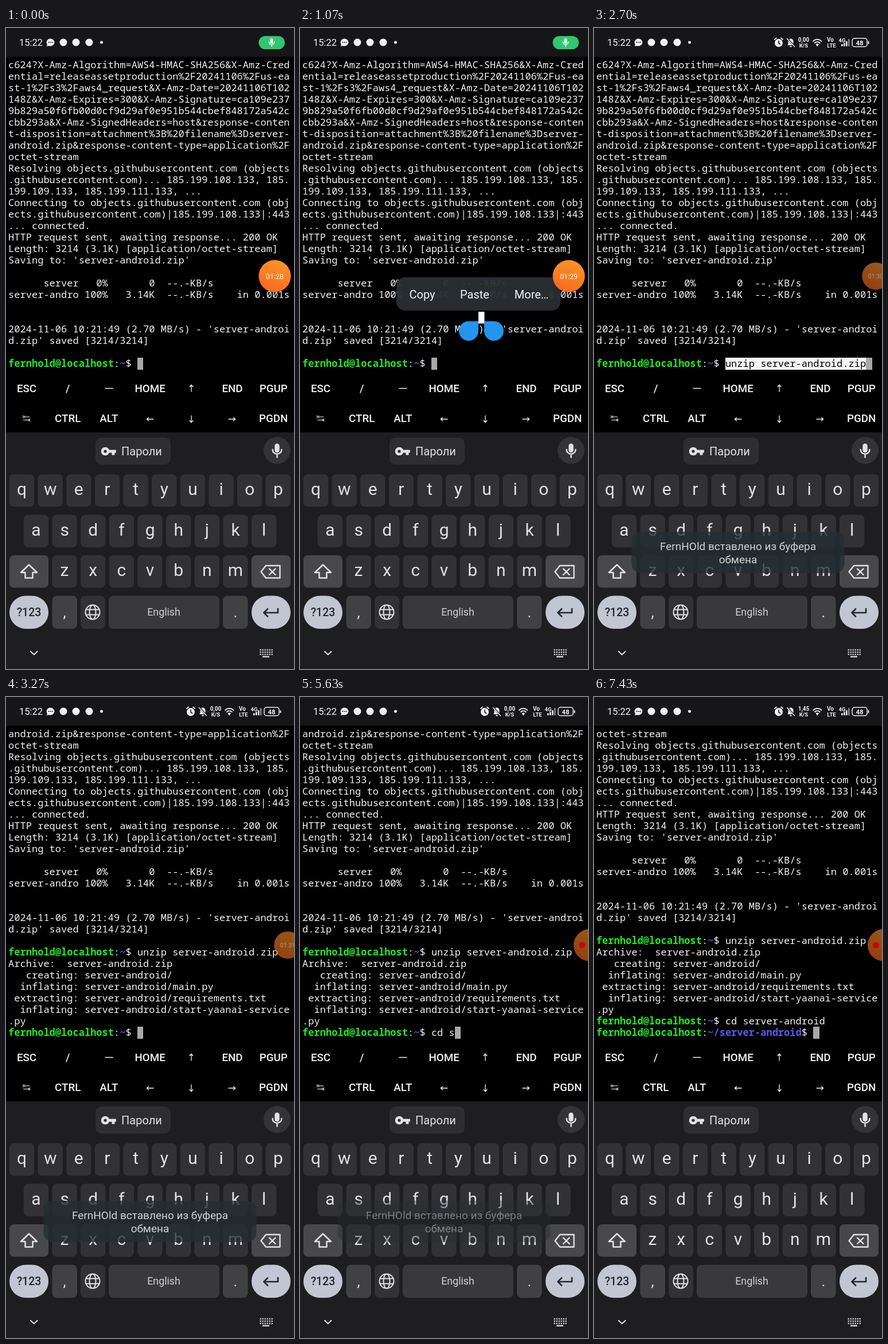
Recreate the animation shown at these times as an HTML page. Size 502x1116 px, loop 7.71 s.

```html
<!DOCTYPE html>
<html lang="ru">
<head>
<meta charset="utf-8">
<title>Terminal</title>
<style>
html, body { margin: 0; width: 100%; height: 100%; overflow: hidden; background: #000; }
svg, #term { position: absolute; left: 0; top: 0; }
svg text { font-family: Roboto, "Open Sans", sans-serif; }
#term { left: 4.1px; top: 54px; margin: 0; color: #f2f2f2; white-space: pre;
  font: 17.04px/20px "Noto Sans Mono", "DejaVu Sans Mono", monospace; }
#term b { color: #1cec22; }
#term i { color: #5a5af0; font-style: normal; font-weight: 700; }
#term u { color: #000; text-decoration: none; }
.block { position: absolute; top: 574px; height: 20.5px; }
</style>
</head>
<body>
<svg id="base" width="502" height="1116" viewBox="0 0 502 1116"></svg>
<div id="mark" class="block" style="background:#f6f6f6"></div>
<div id="cursor" class="block" style="background:#a8a8a8;width:10.2px"></div>
<pre id="term"></pre>
<svg id="over" width="502" height="1116" viewBox="0 0 502 1116"></svg>
<script>
const LOOP = 7710, COL = 10.224, LEFT = 4.1, ROWS = 27;
const $ = id => document.getElementById(id);

// ---- drawing helpers
const rect = (x, y, w, h, r, fill, more = '') =>
  `<rect x="${x}" y="${y}" width="${w}" height="${h}" rx="${r}" fill="${fill}" ${more}/>`;
const disc = (x, y, r, fill) => `<circle cx="${x}" cy="${y}" r="${r}" fill="${fill}"/>`;
const text = (x, y, s, size, fill, weight = 400, anchor = 'middle') =>
  `<text x="${x}" y="${y}" font-size="${size}" fill="${fill}" font-weight="${weight}" text-anchor="${anchor}">${s}</text>`;
const line = (d, color, w = 2) =>
  `<path d="${d}" fill="none" stroke="${color}" stroke-width="${w}" stroke-linecap="round" stroke-linejoin="round"/>`;
const fill = (d, color) => `<path d="${d}" fill="${color}"/>`;

const INK = '#e2e2e6', WHITE = '#f2f2f2', BAR = '#161618', KEY = '#323235', SIDE = '#48484b',
  SPACE = '#39393c', LIGHT = '#c2c5d2', DARK = '#24252e';

function mic(x, y, s, color) {
  return `<g transform="translate(${x} ${y}) scale(${s})">` + rect(-4, -12, 8, 15, 4, color) +
    line('M-7.5-2a7.5 7.5 0 0 0 15 0M0 6v5', color, 2.4) + '</g>';
}

function statusLeft() {
  let s = rect(0, 0, 502, 50, 0, BAR) + text(23, 31, '15:22', 16.5, WHITE, 400, 'start');
  s += fill('M77.500 18.500a7 6.500 0 1 1-3 12.400l-3.600 1.200 1-3.400a7 6.500 0 0 1 5.600-10.200z', WHITE);
  for (const x of [74.5, 77.5, 80.5]) s += disc(x, 25, 1, BAR);
  for (const x of [100, 122, 145]) s += disc(x, 25, 6.5, WHITE);
  return s + disc(166.5, 25, 2.5, WHITE);
}

function statusRight() {
  let s = disc(322, 26, 7, WHITE) + line('M322 22.500v4l2.500 1.500', BAR, 1.6) +
    line('M315 20l3-2.500M329 20l-3-2.500', WHITE, 1.8);
  s += fill('M337 30l1.500-2v-4.500a4.500 5 0 0 1 9 0v4.500l1.500 2zM341 31.500h4a2 2 0 0 1-4 0z', WHITE) +
    line('M337 18.500l12.500 13.500', BAR, 3) + line('M336.500 18.500l13 14', WHITE, 1.4);
  s += `<text id="speed" x="365.500" y="23.500" font-size="10" font-weight="600" fill="${WHITE}" text-anchor="middle"></text>`;
  s += text(365.5, 33.5, 'K/S', 9.5, WHITE, 600);
  s += line('M382 23a10 10 0 0 1 14.500 0M384.800 26a6.500 6.500 0 0 1 9 0', WHITE, 1.8) + fill('M386.500 28.500a4 4 0 0 1 5.500 0l-2.800 4z', WHITE);
  s += text(412, 23.5, 'Vo', 10, WHITE, 600) + text(414, 33.5, 'LTE', 9.5, WHITE, 600) + text(432.5, 24.5, '4G', 9.5, WHITE, 600);
  [4, 6, 9, 13].forEach((h, i) => s += rect(431 + i * 4, 32 - h, 2.6, h, 1, i < 3 ? WHITE : '#8a8a8c'));
  s += rect(450, 18, 26, 14.5, 4, 'none', `stroke="${WHITE}" stroke-width="1.500"`) + rect(477.5, 23, 2, 5, 1, WHITE);
  return s + text(463, 29.5, '48', 11.5, WHITE, 600);
}

function extraKeys() {
  const at = i => 36 + i * 71.7;
  let s = '';
  [['ESC', '/', '', 'HOME', '', 'END', 'PGUP'], ['', 'CTRL', 'ALT', '', '', '', 'PGDN']].forEach((row, j) =>
    row.forEach((k, i) => s += text(at(i), 633.5 + j * 52.5, k, 18.8, WHITE, 500)));
  s += line('M173 627.500h13', WHITE, 1.6);
  const arrow = (x, y, a) => `<g transform="translate(${x} ${y}) rotate(${a})">` + line('M-6 0h11.500M2.500-2.800l3.200 2.800-3.200 2.800', WHITE, 1.3) + '</g>';
  s += arrow(323, 627, -90) + arrow(251, 681, 180) + arrow(323, 681, 90) + arrow(394, 681, 0);
  return s + line('M30 674.500v5M31 677h10M33.500 675l-2.200 2 2.200 2M41.500 680v5M30.500 682.500h10M38.500 680.500l2.200 2-2.200 2', WHITE, 1);
}

function keyboard() {
  let s = rect(0, 704, 502, 412, 0, '#1e1e20');
  s += rect(156, 713, 131, 47, 10, '#2e2e31') + disc(472.5, 735.5, 23.5, '#343437') + mic(472.5, 736, 1.05, INK);
  s += disc(173, 737, 7.3, INK) + rect(176, 734.5, 16, 5, 1, INK) + rect(184.5, 737, 5, 6.5, 0.5, INK) + disc(173, 737, 2.6, '#2e2e31');
  s += text(201, 744, 'Пароли', 20, INK, 400, 'start');
  [['qwertyuiop', 27.5, 777], ['asdfghjkl', 52.5, 847.5], ['zxcvbnm', 102, 918]].forEach(([keys, x, y]) =>
    [...keys].forEach((k, i) => {
      const cx = x + i * 49.65;
      s += rect(cx - 21.7, y, 43.4, 56.5, 8, KEY) + text(cx, y + 36, k, 30, INK);
    }));
  s += rect(6, 918, 68, 56.5, 8, SIDE) + line('M40 934.500l14 13.500h-7.500v9.500h-13v-9.500h-7.500z', INK, 2.5);
  s += rect(428, 918, 68, 56.5, 8, SIDE) + line('M453 936h24.500v21.500h-24.500l-8.500-10.700zM459 941.500l10.500 10.500M469.500 941.500l-10.500 10.500', INK, 2.4);
  s += rect(6, 988.5, 68, 57.5, 28.5, LIGHT) + text(40, 1024, '?123', 19.5, DARK, 500);
  s += rect(80.5, 988.5, 43.5, 57.5, 8, '#414144') + text(102, 1026, ',', 26, INK);
  s += rect(130, 988.5, 43, 57.5, 8, KEY) + line('M138.500 1017a12.500 12.500 0 1 0 25 0a12.500 12.500 0 1 0-25 0M145.500 1017a5.500 12.500 0 1 0 11 0a5.500 12.500 0 1 0-11 0M140 1012.500h22M140 1021.500h22', INK, 2);
  s += rect(179, 988.5, 193, 57.5, 8, SPACE, 'id="space"') + text(275, 1023, 'English', 17.8, '#d0d0d6');
  s += rect(378, 988.5, 43.5, 57.5, 8, '#414144') + text(400, 1026, '.', 26, INK);
  s += rect(428, 988.5, 68, 57.5, 28.5, LIGHT) + line('M474 1011v7h-24M456 1011.500l-6.500 6.500 6.500 6.500', DARK, 2.6);
  s += line('M43 1085.500l5.800 5.500 5.800-5.500', INK, 2);
  for (let r = 0; r < 3; r++) for (let c = 0; c < 6; c++) s += rect(442.5 + c * 4, 1081.5 + r * 4, 2.3, 2.3, 0.5, INK);
  return s + rect(447, 1093.5, 12, 2.2, 0.5, INK);
}

$('base').innerHTML = statusLeft() +
  `<g id="pill">${rect(440.5, 14, 45.5, 23, 11.5, '#32c670')}${mic(463, 25.5, 0.62, '#fff')}</g>` +
  `<g id="icons">${statusRight()}</g>` + extraKeys() + keyboard();

const USER = '<b>fernhold@localhost</b>:';
const prompt = path => `${USER}<i>${path}</i>$ `;

$('over').innerHTML = `<defs><linearGradient id="warm" x1="0.700" y1="0" x2="0.300" y2="1">
  <stop offset="0" stop-color="#ff942c"/><stop offset="1" stop-color="#f7681c"/></linearGradient></defs>` +
  '<g id="handles">' + rect(311, 494, 10.5, 20.5, 0, '#fff') +
  fill('M294 510.500h17v17a17 17 0 1 1-17-17zM338 510.500h-17v17a17 17 0 1 0 17-17z', '#2494ee') + '</g>' +
  '<g id="menu">' + rect(168, 434, 286, 58, 15, '#2a2f34', 'fill-opacity="0.950"') +
  text(213, 471, 'Copy', 20, WHITE) + text(304.5, 471, 'Paste', 20, WHITE) + text(403.5, 471, 'More…', 20, WHITE) + '</g>' +
  '<g id="toast">' + rect(65.5, 877, 371, 72, 16, '#252e33', 'fill-opacity="0.780"') +
  text(251, 909, 'FernHOld вставлено из буфера', 19, '#cdd2d5') + text(251, 932, 'обмена', 19, '#cdd2d5') + '</g>' +
  `<g id="bubble">${disc(0, 0, 28, 'url(#warm)')}<text id="clock" y="4.500" font-size="12.500" fill="#fff" text-anchor="middle"></text></g>` +
  `<g id="dot">${disc(491.5, 432, 5.5, '#c4080c')}</g>`;

// ---- terminal contents
const LOG = `c624?X-Amz-Algorithm=AWS4-HMAC-SHA256&X-Amz-Cred
ential=releaseassetproduction%2F20241106%2Fus-ea
st-1%2Fs3%2Faws4_request&X-Amz-Date=20241106T102
148Z&X-Amz-Expires=300&X-Amz-Signature=ca109e237
9b829a50f6fb00d0cf9d29af0e951b544cbef848172a542c
cbb293a&X-Amz-SignedHeaders=host&response-conten
t-disposition=attachment%3B%20filename%3Dserver-
android.zip&response-content-type=application%2F
octet-stream
Resolving objects.githubusercontent.com (objects
.githubusercontent.com)... 185.199.108.133, 185.
199.109.133, 185.199.111.133, ...
Connecting to objects.githubusercontent.com (obj
ects.githubusercontent.com)|185.199.108.133|:443
... connected.
HTTP request sent, awaiting response... 200 OK
Length: 3214 (3.1K) [application/octet-stream]
Saving to: 'server-android.zip'

      server   0%       0  --.-KB/s
server-andro 100%   3.14K  --.-KB/s    in 0.001s


2024-11-06 10:21:49 (2.70 MB/s) - 'server-androi
d.zip' saved [3214/3214]

`.replace(/&/g, '&amp;').split('\n').slice(0, 26).concat([
  prompt('~') + 'unzip server-android.zip',
  'Archive:  server-android.zip',
  '   creating: server-android/',
  '  inflating: server-android/main.py',
  ' extracting: server-android/requirements.txt',
  '  inflating: server-android/start-yaanai-service',
  '.py',
  prompt('~') + 'cd server-android']);

// start time, log lines, path, typed text, pasted
const STEPS = [
  [0, 26, '~', ''],
  [1830, 26, '~', 'unzip server-android.zip', true],
  [2750, 33, '~', ''],
  [4250, 33, '~', 'c'],
  [4600, 33, '~', 'cd'],
  [4850, 33, '~', 'cd '],
  [5350, 33, '~', 'cd s'],
  [5920, 33, '~', 'cd server-android'],
  [7060, 34, '~/server-android', '']];

let shown = null;
function showTerm(step) {
  if (step === shown) return;
  shown = step;
  const [, count, path, typed, pasted] = step;
  const start = 21 + path.length;
  $('term').innerHTML = LOG.slice(count - ROWS + 1, count).join('\n') + '\n' +
    prompt(path) + (pasted ? `<u>${typed}</u>` : typed);
  $('cursor').style.left = LEFT + (start + typed.length) * COL + 'px';
  $('mark').style.left = LEFT + start * COL + 'px';
  $('mark').style.width = (pasted ? typed.length * COL : 0) + 'px';
}

// ---- timeline
const ramp = (t, a, b) => Math.min(1, Math.max(0, (t - a) / (b - a)));
const ease = u => u * u * (3 - 2 * u);
const show = (id, o) => $(id).setAttribute('opacity', o);

function draw(t) {
  showTerm(STEPS.filter(s => s[0] <= t).pop());

  const swap = ramp(t, 2480, 2680);
  show('pill', 1 - swap);
  show('icons', swap);
  $('speed').textContent = t < 7030 ? '0,00' : '1,45';
  $('space').setAttribute('fill', t >= 4740 && t < 4860 ? '#444447' : SPACE);

  show('handles', t >= 720 && t < 1800 ? 1 : 0);
  show('menu', ramp(t, 720, 870) * (1 - ramp(t, 1890, 2000)));
  show('toast', ramp(t, 1770, 1930) * (1 - ramp(t, 5540, 5720)));

  const dock = ease(ramp(t, 1350, 1600)), tuck = ease(ramp(t, 5250, 5450));
  const x = 468.5 + 22.5 * dock + 14 * tuck, size = 1 - 0.15 * dock + 0.15 * tuck;
  $('bubble').setAttribute('transform', `translate(${x} 432) scale(${size})`);
  show('bubble', 1 - 0.4 * dock);
  $('clock').textContent = '01:' + (28 + Math.floor(t / 950));
  show('clock', 1 - tuck);
  show('dot', tuck);
}

function tick() {
  draw(performance.now() % LOOP);
  requestAnimationFrame(tick);
}
tick();
</script>
</body>
</html>
```
